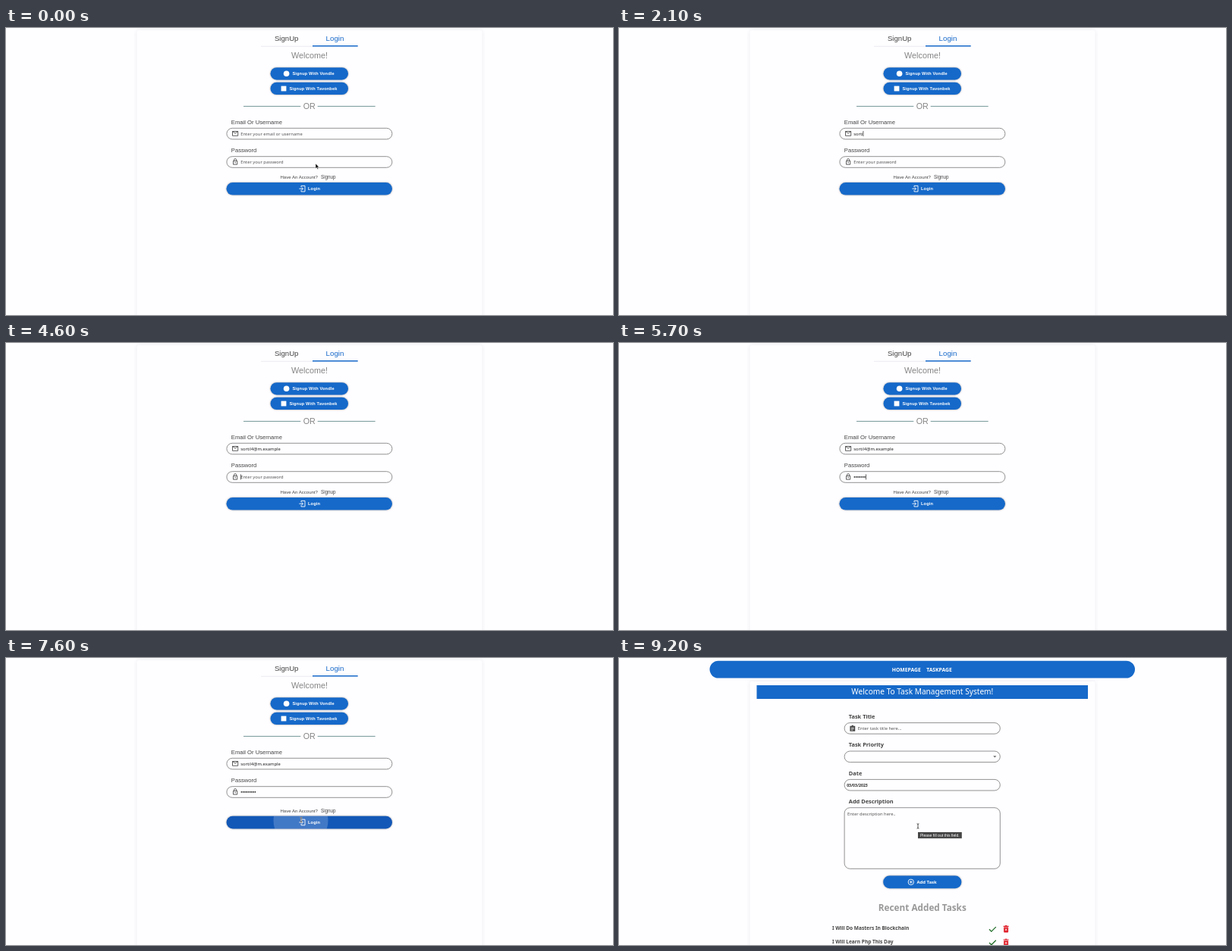
Animation of 800 by 379 pixels, one loop 9900 ms. Source, as an HTML page:

```html
<!DOCTYPE html>
<html lang="en">
<head>
<meta charset="utf-8">
<title>Task manager login</title>
<style>
  html, body { margin: 0; width: 100%; height: 100%; overflow: hidden; background: #fefdff; }
  svg { display: block; width: 100vw; height: 100vh; }
  text { font-family: "Noto Sans", "Open Sans", sans-serif; fill: #444; white-space: pre; }
  .sans text, text.sans { font-family: "Liberation Sans", Arial, sans-serif; }
  .mid { text-anchor: middle; }
  .panel { fill: #fefdff; filter: drop-shadow(0 0 2.5px rgba(20, 20, 40, .09)); }
  .blue { fill: #1669c9; }
  .raised { filter: drop-shadow(0 .9px .9px rgba(0, 0, 0, .38)); }
  .box { fill: #fefdff; stroke: #777; stroke-width: .8; }
  .sans .label { font-size: 7.65px; fill: #444; }
  .sans .btn { font: bold 5.65px "Liberation Sans", Arial, sans-serif; letter-spacing: .14px; }
  .white, text.white, .sans text.white { fill: #fff; }
  .hint { font-size: 5.8px; fill: #555; }
  .sans .hint, .sans .value { font-family: "Noto Sans", "Open Sans", sans-serif; }
  .value { font-size: 5.8px; fill: #222; }
  .field { font-size: 7.4px; font-weight: 600; }
  .task { font-size: 6.56px; font-weight: 600; }
  .line { fill: none; stroke: #444; stroke-width: .85; }
  .rule { stroke: #658d8d; stroke-width: .9; }
  .ink { fill: none; stroke: #fff; stroke-width: .9; }
</style>
</head>
<body>
<svg viewBox="0 0 800 379" preserveAspectRatio="none">
  <defs>
    <clipPath id="pill"><rect x="290.5" y="204" width="218.5" height="16.6" rx="8.3"/></clipPath>
    <g id="tools">
      <path d="M488 .3l2.8 2.8 6-6" fill="none" stroke="#22702a" stroke-width="1.3"/>
      <path d="M506.6-4.2h2l.6-.8h1.8l.6.8h2v1.1h-7zM507.1-2.5h6v6q0 1-1 1h-4q-1 0-1-1z" fill="#e0202b"/>
      <path d="M508.8-.7l2.6 2.8m0-2.8l-2.6 2.8" stroke="#fff" stroke-width=".8"/>
    </g>
  </defs>

  <g id="login" class="sans">
    <rect class="panel" x="172.5" y="3" width="455" height="400" rx="3"/>
    <text class="mid" x="369.7" y="17.2" font-size="9.65">SignUp</text>
    <text class="mid blue" x="433.5" y="17.2" font-size="9.75" style="fill:#1669c9">Login</text>
    <path d="M336 24.2h68" stroke="#e6e5ea" stroke-width=".8"/>
    <path d="M404 23.7h59.7" stroke="#1669c9" stroke-width="1.4"/>
    <text class="mid" x="400" y="40" font-size="10.8" style="fill:#858585">Welcome!</text>

    <rect class="blue raised" x="348.5" y="52.2" width="102.5" height="16.3" rx="8.15"/>
    <circle class="white" cx="369.6" cy="60.3" r="3.8"/>
    <text class="btn white" x="377.4" y="62.3">Signup With Vondle</text>
    <rect class="blue raised" x="348.5" y="71.8" width="102.5" height="16.3" rx="8.15"/>
    <rect class="white" x="362.6" y="76.6" width="6.8" height="6.8"/>
    <text class="btn white" x="373.4" y="82">Signup With Tavonbek</text>

    <path class="rule" d="M313 103.4h75.3M410.7 103.4h76"/>
    <text class="mid" x="399.8" y="107" font-size="10.7" style="fill:#858585">OR</text>

    <text class="label" x="296.8" y="126.6">Email Or Username</text>
    <rect class="box" x="290.9" y="132.3" width="218" height="14.6" rx="7.3"/>
    <path class="line" d="M298.5 136.5h7.2v5.8h-7.2zl3.6 2.6 3.6-2.6"/>
    <text class="hint" id="mailHint" x="309.3" y="141.5">Enter your email or username</text>
    <text class="value" id="mail" x="309.3" y="141.5"></text>

    <text class="label" x="296.8" y="164">Password</text>
    <rect class="box" x="290.9" y="169.7" width="218" height="14.6" rx="7.3"/>
    <path class="line" d="M299.5 175.5h5.2v4.7h-5.2zM300.5 175.5v-1.2a1.6 1.6 0 0 1 3.2 0v1.2"/>
    <circle cx="302.1" cy="177.8" r=".7" fill="#444"/>
    <text class="hint" id="passHint" x="309.3" y="178.9">Enter your password</text>
    <g id="dots" fill="#222"></g>
    <rect id="caret" width=".7" height="7" fill="#222"/>

    <g id="foot">
      <text x="361.5" y="198.8" font-size="6.05">Have An Account?</text>
      <text x="415" y="198.8" font-size="6.3">Signup</text>
      <rect class="blue raised" id="submit" x="290.5" y="204" width="218.5" height="16.6" rx="8.3"/>
      <g clip-path="url(#pill)"><circle id="ripple" cx="388.5" cy="210" fill="#fff" opacity=".2"/></g>
      <path class="ink" d="M389 210.2v-1.8h5v7.6h-5v-1.8M386.4 212.2h5M389.7 210.4l1.8 1.8-1.8 1.8"/>
      <text class="btn white" x="398" y="214.3">Login</text>
    </g>
  </g>

  <g id="home">
    <rect class="panel" x="172.5" y="31" width="455" height="370" rx="3"/>
    <rect class="blue" x="119.5" y="3.7" width="560.5" height="22.8" rx="11.4"/>
    <g font-size="6.8" font-weight="700">
      <text class="white" x="359.7" y="17.6">HOMEPAGE</text>
      <text class="white" x="405.2" y="17.6">TASKPAGE</text>
    </g>
    <rect class="blue" x="181.5" y="36" width="436.5" height="18"/>
    <text class="mid white" x="399.8" y="48.3" font-size="10.15" font-weight="500">Welcome To Task Management System!</text>

    <text class="field" x="302.8" y="79.7">Task Title</text>
    <rect class="box" x="297.1" y="85.6" width="205.2" height="14.6" rx="7.3"/>
    <path d="M304.4 89.8h2l.8-1h1.2l.8 1h2v7h-6.8z" fill="#444"/>
    <path d="M305.8 92h4M305.8 93.6h4M305.8 95.2h2.6" stroke="#fff" stroke-width=".7"/>
    <text class="hint" x="314.7" y="95">Enter task title here...</text>

    <text class="field" x="302.8" y="117.2">Task Priority</text>
    <rect class="box" x="297.1" y="123" width="205.2" height="14.6" rx="7.3"/>
    <path d="M493.2 129.3h4.2l-2.1 2.2z" fill="#666"/>

    <text class="field" x="302.8" y="154.9">Date</text>
    <rect class="box" x="297.1" y="160.4" width="205.2" height="14.6" rx="7.3"/>
    <text x="300.2" y="169.5" font-size="5.1" font-weight="600" style="fill:#222">03/03/2023</text>

    <text class="field" x="302.8" y="192.2">Add Description</text>
    <rect class="box" x="297.1" y="197.7" width="205.2" height="80.6" rx="7.3"/>
    <text class="hint" x="301" y="207.9">Enter description here..</text>

    <rect class="blue raised" x="348.2" y="287.6" width="103.2" height="16.6" rx="8.3"/>
    <circle class="ink" cx="384.8" cy="295.9" r="3.7"/>
    <path class="ink" d="M382.8 295.9h4M384.8 293.9v4"/>
    <text class="white" x="392.4" y="298.1" font-size="5.95" font-weight="600">Add Task</text>

    <text class="mid" x="399.8" y="334.4" font-size="11.75" font-weight="600" style="fill:#999">Recent Added Tasks</text>
    <g id="tasks">
      <text class="task" x="281" y="359.2">I Will Do Masters In Blockchain</text>
      <use href="#tools" y="358"/>
      <text class="task" x="281" y="376.7">I Will Learn Php This Day</text>
      <use href="#tools" y="375.7"/>
    </g>
    <g id="tip">
      <rect x="394" y="230" width="57.8" height="8.2" fill="#454545"/>
      <text class="sans mid white" x="422.8" y="235.9" font-size="5.1">Please fill out this field.</text>
    </g>
  </g>

  <g id="pointer">
    <path id="arrow" d="M0-3v6.6l1.5-1.4 1.1 2.4 1.1-.5-1.1-2.3h2z" fill="#000" stroke="#fff" stroke-width=".5"/>
    <g id="beam" fill="none">
      <path d="M-1.4-3.2q1.4 0 1.4 1v4.4q0 1-1.4 1M1.4-3.2q-1.4 0-1.4 1M0 2.2q0 1 1.4 1" stroke="#fff" stroke-width="1.6"/>
      <path d="M-1.4-3.2q1.4 0 1.4 1v4.4q0 1-1.4 1M1.4-3.2q-1.4 0-1.4 1M0 2.2q0 1 1.4 1" stroke="#222" stroke-width=".8"/>
    </g>
    <path id="hand" d="M-1.3-3q.6-.6 1.1 0v2.2l2.5.5q.9.2.8 1.1l-.5 2.9h-3.5l-2-2.8q0-.9.8-.6l.8.6z" fill="#fff" stroke="#222" stroke-width=".75"/>
  </g>
</svg>

<script>
const LOOP = 9900, STEP = 100, CUT = 7700;
const $ = id => document.getElementById(id);
const show = (id, on) => { $(id).style.display = on ? "" : "none"; };

const ADDRESS = "sortil4@m.example";
const mailKeys = [1400, 1500, 1700, 1900, 2100, 2200, 2800, 3000];
for (let t = 3200; mailKeys.length < ADDRESS.length; t += 100) mailKeys.push(t);
const passKeys = [4900, 5000, 5100, 5300, 5400, 5500, 5600, 5800, 5900];
const MAIL_FOCUS = 1000, PASS_FOCUS = 4500, PRESS = 7500;
const TEXT_X = 309.3, DOT_GAP = 2.25;

// time, x, y
const route = [
  [200, 408, 182], [900, 392, 140], [6800, 374, 256], [6900, 378, 246],
  [7000, 379, 243], [7400, 389, 213], [7700, 389, 214],
  [8000, 389, 214], [8400, 394, 222]
];

$("dots").innerHTML = passKeys.map((_, i) =>
  `<circle cx="${TEXT_X + 1.1 + i * DOT_GAP}" cy="176.9" r=".85"/>`).join("");

function pointerAt(t) {
  const next = route.findIndex(p => p[0] > t);
  if (next === 0) return route[0].slice(1);
  if (next < 0) return route[route.length - 1].slice(1);
  const [t0, x0, y0] = route[next - 1], [t1, x1, y1] = route[next];
  const k = (t - t0) / (t1 - t0), e = k * k * (3 - 2 * k);
  return [x0 + (x1 - x0) * e, y0 + (y1 - y0) * e];
}

const typed = (keys, t) => keys.filter(k => k <= t).length;

function drawForm(t) {
  const chars = typed(mailKeys, t), dots = typed(passKeys, t);
  $("mail").textContent = ADDRESS.slice(0, chars);
  show("mailHint", !chars);
  show("passHint", !dots);
  [...$("dots").children].forEach((dot, i) => dot.setAttribute("opacity", i < dots ? 1 : 0));

  const inPass = t >= PASS_FOCUS;
  const last = inPass
    ? (dots ? passKeys[dots - 1] : PASS_FOCUS)
    : (chars ? mailKeys[chars - 1] : MAIL_FOCUS);
  const lit = t >= MAIL_FOCUS && t < PRESS && Math.floor((t - last) / 500) % 2 === 0;
  const width = inPass ? dots * DOT_GAP : chars ? $("mail").getComputedTextLength() : 0;
  show("caret", lit);
  $("caret").setAttribute("x", TEXT_X + width);
  $("caret").setAttribute("y", inPass ? 173.4 : 136);

  const pressed = t >= PRESS;
  $("foot").setAttribute("transform", `translate(0 ${pressed ? 4.8 : 0})`);
  $("submit").style.fill = t >= 7400 ? "#1358b7" : t >= 7300 ? "#1560c0" : "";
  $("ripple").setAttribute("r", pressed ? 14 + (t - PRESS) * .22 : 0);
}

function drawPointer(t) {
  const [x, y] = pointerAt(t);
  const inField = y < 147 || (y > 169 && y < 184);
  const kind = t <= 200 ? "arrow"
    : t < 6800 ? (inField ? "beam" : "arrow")
    : t < PRESS ? "hand" : "beam";
  show("pointer", t < mailKeys[0] || t >= 6800);
  ["arrow", "beam", "hand"].forEach(id => show(id, id === kind));
  $("pointer").setAttribute("transform", `translate(${x} ${y})`);
}

function draw(now) {
  const t = Math.floor((now % LOOP) / STEP) * STEP;
  show("login", t < CUT);
  show("home", t >= CUT);
  if (t < CUT) drawForm(t);
  show("tasks", t >= 7800);
  $("tip").setAttribute("opacity", t >= 9200 ? 1 : t >= 9100 ? .5 : 0);
  drawPointer(t);
}

const start = performance.now();
function tick() {
  draw(performance.now() - start);
  requestAnimationFrame(tick);
}
tick();
</script>
</body>
</html>
```
